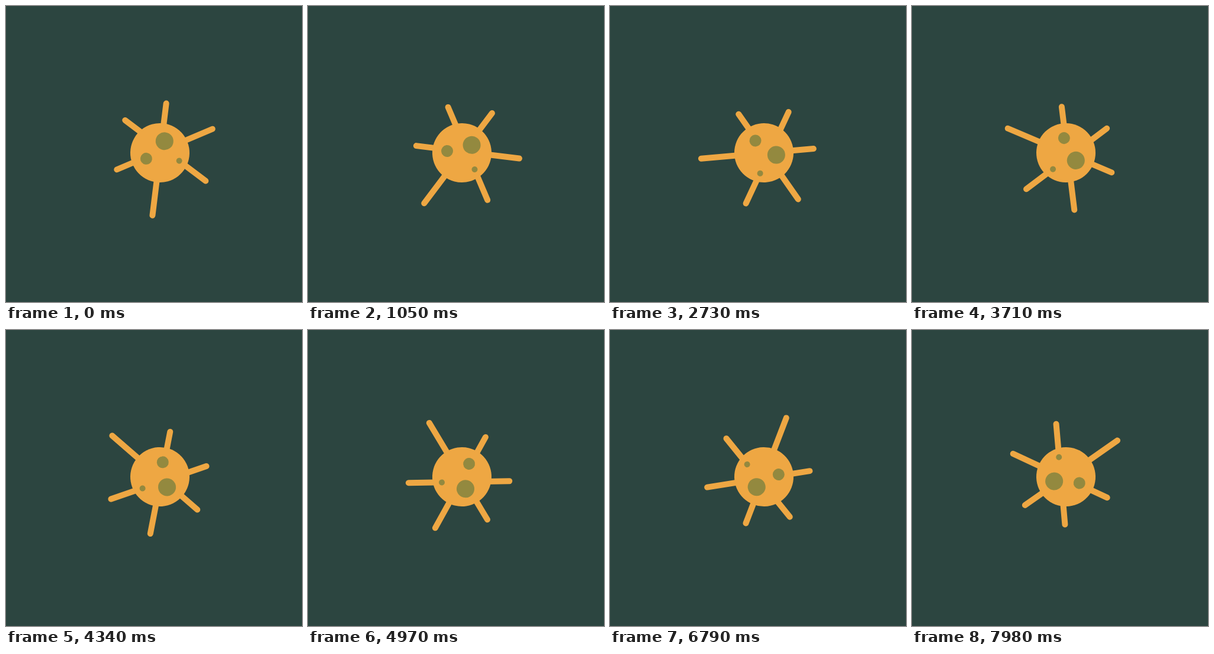
These frames come from a looping animation (500 px wide and 500 px high, 8 s). An HTML page with a canvas:

```html
<!DOCTYPE html>
<html lang="en">
<head>
<meta charset="utf-8">
<title>Spinning cell</title>
<style>
  html, body { margin: 0; width: 100%; height: 100%; overflow: hidden; background: #2c4540; }
  canvas { display: block; width: 100vmin; height: 100vmin; }
</style>
</head>
<body>
<canvas id="stage"></canvas>
<script>
const SIZE = 500, LOOP = 8000, STEP = 70;
const START_DEG = 7, STEP_DEG = 2;
const BACK = '#2c4540', BODY = '#eea743', SPOT = '#93893f';

// Each rod crosses the body: direction, sideways offset, and its two ends.
const rods = [
  { deg: 90, side: -0.4, from: -84.1, to: 106.5 },
  { deg: 30, side: -8.6, from: -80.1, to: 90.3 },
  { deg: -30, side: -2.4, from: -78, to: 97.4 }
];
const spots = [
  { x: 5.3, y: -20.5, r: 15 },
  { x: -21.7, y: 12.6, r: 10 },
  { x: 34, y: 9.4, r: 5 }
];

const canvas = document.getElementById('stage');
const ctx = canvas.getContext('2d');
const rad = deg => deg * Math.PI / 180;

function disc(x, y, r, color) {
  ctx.fillStyle = color;
  ctx.beginPath();
  ctx.arc(x, y, r, 0, Math.PI * 2);
  ctx.fill();
}

function rod({ deg, side, from, to }) {
  ctx.save();
  ctx.rotate(rad(deg));
  ctx.beginPath();
  ctx.moveTo(from, side);
  ctx.lineTo(to, side);
  ctx.stroke();
  ctx.restore();
}

function draw(time) {
  const scale = canvas.width / SIZE;
  const turn = START_DEG + STEP_DEG * Math.floor(time / STEP);
  ctx.setTransform(scale, 0, 0, scale, 0, 0);
  ctx.fillStyle = BACK;
  ctx.fillRect(0, 0, SIZE, SIZE);
  ctx.translate(260, 248);
  ctx.rotate(rad(turn));
  ctx.strokeStyle = BODY;
  ctx.lineWidth = 10;
  ctx.lineCap = 'round';
  rods.forEach(rod);
  disc(0, 0, 50, BODY);
  spots.forEach(s => disc(s.x, s.y, s.r, SPOT));
}

function resize() {
  const side = Math.min(innerWidth, innerHeight) || SIZE;
  canvas.width = canvas.height = Math.round(side * (devicePixelRatio || 1));
}

let start = null;
function tick() {
  const now = performance.now();
  if (start === null) start = now;
  draw((now - start) % LOOP);
  requestAnimationFrame(tick);
}

addEventListener('resize', resize);
resize();
draw(0);
requestAnimationFrame(tick);
</script>
</body>
</html>
```
